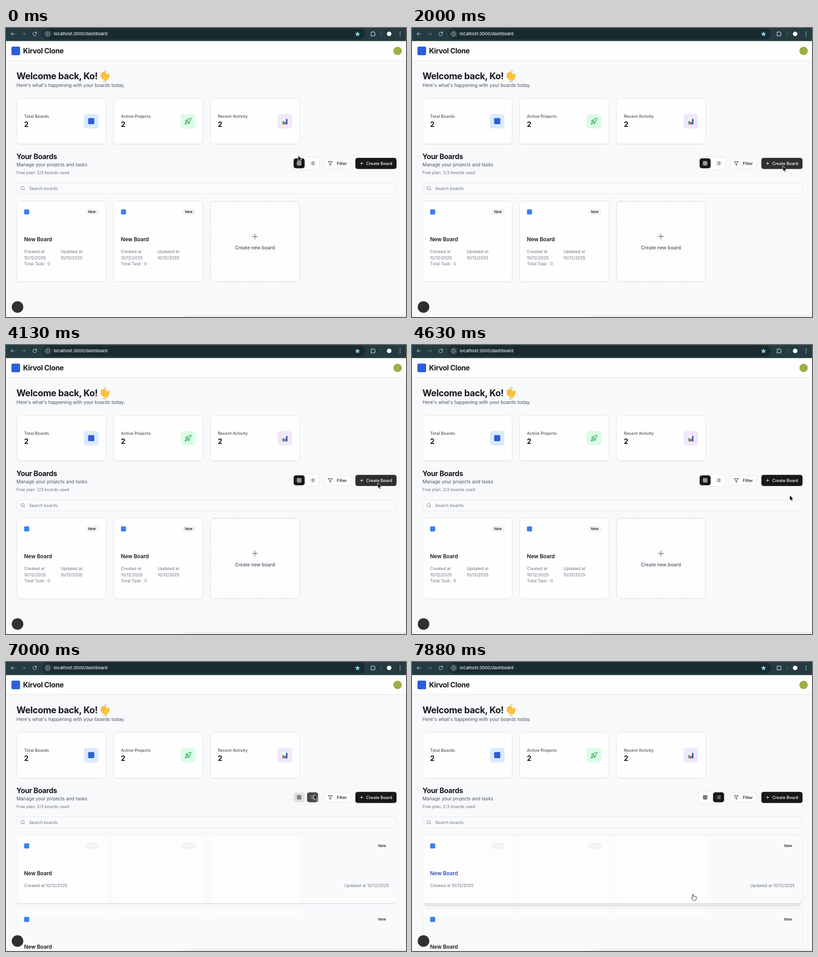
An HTML page that plays this animation: 879x637 px, repeating every 8 s.

```html
<!DOCTYPE html>
<html lang="en">
<head>
<meta charset="utf-8">
<title>Dashboard</title>
<style>
  html, body { margin: 0; width: 100%; height: 100%; overflow: hidden; background: #f8f9fb; }
  svg { display: block; }
  text { font-family: Inter, "Open Sans", sans-serif; font-optical-sizing: none; white-space: pre; }
  .icon { fill: none; stroke: currentColor; stroke-linecap: round; stroke-linejoin: round; }
  .heading { font-weight: 700; letter-spacing: -.02em; fill: #16181d; }
</style>
</head>
<body>
<svg id="stage" width="879" height="637" viewBox="0 0 879 637"></svg>
<script>
const INK = '#18181b', MUTED = '#4b5563', SOFT = '#6b7280', LINE = '#e3e6ea', BLUE = '#3b7ff5';
const SMALL = 9.13, BODY = 10.3;

const text = (x, y, value, size = SMALL, fill = MUTED, weight = 400, extra = '') =>
  `<text x="${x}" y="${y}" font-size="${size}" fill="${fill}" font-weight="${weight}" ${extra}>${value}</text>`;
const heading = (x, y, value, size = 15.6) =>
  `<text class="heading" x="${x}" y="${y}" font-size="${size}">${value}</text>`;
const box = (x, y, w, h, r, fill, stroke = 'none', extra = '') =>
  `<rect x="${x}" y="${y}" width="${w}" height="${h}" rx="${r}" fill="${fill}" stroke="${stroke}" ${extra}/>`;
const icon = (x, y, size, d, color, width = 2, extra = '') =>
  `<g transform="translate(${x} ${y}) scale(${size / 24})" color="${color}" ${extra}>
     <path class="icon" stroke-width="${width}" d="${d}"/></g>`;

const ICONS = {
  back: 'M20 12H4m7-7-7 7 7 7',
  forward: 'M4 12h16m-7-7 7 7-7 7',
  reload: 'M20 12a8 8 0 1 1-2.4-5.7L20 8.5M20 3v5.5h-5.5',
  info: 'M12 2a10 10 0 1 0 0 20a10 10 0 1 0 0-20M12 11v6M12 7v.2',
  puzzle: 'M4 6h5a2.5 2.5 0 1 1 5 0h5v5a2.5 2.5 0 1 1 0 5v5H4v-5a2.5 2.5 0 1 0 0-5z',
  rocket: 'M4.5 16.5c-1.5 1.3-2 5-2 5s3.7-.5 5-2c.7-.8.7-2.1-.1-2.9a2.2 2.2 0 0 0-2.9-.1z' +
    'M12 15l-3-3a22 22 0 0 1 2-4A13 13 0 0 1 22 2c0 2.7-.8 7.5-6 11a22 22 0 0 1-4 2z' +
    'M9 12H4s.6-3 2-4c1.6-1.1 5 0 5 0M12 15v5s3-.6 4-2c1.1-1.6 0-5 0-5',
  grid: 'M5 3h14a2 2 0 0 1 2 2v14a2 2 0 0 1-2 2H5a2 2 0 0 1-2-2V5a2 2 0 0 1 2-2zM3 9h18M3 15h18M9 3v18M15 3v18',
  list: 'M8 6h13M8 12h13M8 18h13M3 6h.1M3 12h.1M3 18h.1',
  filter: 'M22 3H2l8 9.5V19l4 2v-8.5z',
  plus: 'M5 12h14M12 5v14',
  search: 'M11 3a8 8 0 1 0 0 16a8 8 0 1 0 0-16M21 21l-4.3-4.3'
};

const browserBar = () => {
  const pale = '#d5dfe1';
  return box(0, 0, 879, 28.8, 0, '#243b41') + box(80, 1, 709, 24, 12, '#1a2b2f') +
    icon(9, 7, 12, ICONS.back, pale) + icon(33, 7, 12, ICONS.forward, '#73858a') +
    icon(57, 7, 12, ICONS.reload, pale) +
    '<circle cx="91.5" cy="13" r="9" fill="#2c4147"/>' + icon(86.5, 8, 10, ICONS.info, pale) +
    text(105, 16.4, 'localhost:3000/dashboard', 9.3, '#e6edee', 500) +
    '<path d="M772.5 7.5l1.6 3.700 4 .4-3 2.700.9 4-3.5-2.100-3.5 2.100.9-4-3-2.700 4-.4z" fill="#7fd3ee"/>' +
    icon(800, 6, 13, ICONS.puzzle, pale) +
    '<path d="M824.5 8v10" stroke="#50666b"/><circle cx="842" cy="13" r="5" fill="#fff"/>' +
    [9, 13, 17].map(y => `<circle cx="866" cy="${y}" r="1.1" fill="${pale}"/>`).join('');
};

const wavingHand = () => {
  const fingers = 'M-4.5 2.500L-5-4M-1.500 0L-1.700-7.500M1.700 0V-8M4.800 2L5-6';
  return `<g transform="translate(216.500 107) rotate(-38) scale(1.08)" stroke-linecap="round" fill="none">
    <path d="${fingers}" stroke="#e5a02c" stroke-width="3.700"/>
    <path d="${fingers}" stroke="#fbc540" stroke-width="2.800"/>
    <path d="M-6 0h12.600v4a6.300 5.600 0 0 1-12.600 0z" fill="#fbc540"/>
    <path d="M5.500 6l4-4.500" stroke="#f5b933" stroke-width="3.200"/>
    <path d="M-8 6q1.200 3.500 4.500 4.500M6.500-9.500q2.500 1 3.500 4" stroke="#9aa7ad" stroke-width="1"/>
  </g>`;
};

const shell = () => box(0, 28, 879, 43, 0, '#fefefe') + box(0, 71, 879, 1, 0, LINE) + browserBar() +
  box(12, 41, 19, 19, 3, '#2b5fd9') + heading(37.5, 56.2, 'Kirvol Clone') +
  '<circle cx="860.500" cy="50.500" r="9.300" fill="#9caf45"/>' +
  heading(23, 113, 'Welcome back, Ko!', 19.75) + wavingHand() +
  text(23, 129.7, "Here's what's happening with your boards today.", BODY);

const stats = () => ['Total Boards', 'Active Projects', 'Recent Activity'].map((label, i) => {
  const x = 23.5 + i * 212.8;
  return box(x, 155.5, 196.500, 100, 8, '#fefefe', LINE, 'filter="url(#small)"') +
    text(x + 16.3, 198.2, label, SMALL, MUTED, 500) + heading(x + 16.3, 218, '2') +
    box(x + 147.7, 189.500, 32, 32, 6, ['#dbeafe', '#dcfce7', '#f1e7fd'][i]);
}).join('') +
  box(180.5, 198.5, 13.500, 13.500, 2, '#2b5fd9') +
  icon(392, 197.500, 16, ICONS.rocket, '#2da650') +
  box(606.500, 199.500, 13, 13, 1, '#f5f4f8') +
  box(607.5, 205, 3.2, 7.5, 0, '#2d9a4c') + box(611.4, 207, 3.2, 5.5, 0, '#d3363e') +
  box(615.2, 200.500, 3.2, 12, 0, '#2451ae');

const toolbar = () => heading(23, 288.6, 'Your Boards') +
  text(23, 305.1, 'Manage your projects and tasks', BODY) +
  text(23, 322, 'Free plan: 2/3 boards used', SMALL, SOFT) +
  box(629.5, 284.5, 59.500, 27.500, 4, '#fefefe', LINE) +
  box(632, 287.3, 24.3, 22, 5, INK, 'none', 'id="gridButton"') +
  box(661.5, 287.3, 24.3, 22, 5, '#fff', 'none', 'id="listButton"') +
  icon(638.700, 292.800, 11, ICONS.grid, '#fff', 2, 'id="gridIcon"') +
  icon(668.200, 292.800, 11, ICONS.list, INK, 2, 'id="listIcon"') +
  box(700, 288, 57.500, 21, 4.5, '#fefefe', LINE) +
  icon(707, 293, 11, ICONS.filter, INK) + text(727, 301.7, 'Filter', SMALL, INK, 500) +
  box(767.7, 286.2, 90.5, 24.5, 5, INK, 'none', 'id="createButton"') +
  icon(776, 293, 11, ICONS.plus, '#fff') + text(791.5, 301.7, 'Create Board', SMALL, '#fafafa', 500) +
  box(23.5, 341.5, 834.500, 24, 4.5, '#f9fafb', LINE) +
  icon(31.500, 348, 11, ICONS.search, SOFT) + text(50.700, 357.2, 'Search boards', SMALL, SOFT);

const badge = (x, fill = '#f4f4f5', ink = INK) =>
  box(x, 398, 30, 14.500, 7.2, fill) + text(x + 14.5, 408.1, 'New', 7.8, ink, 500, 'text-anchor="middle"');
const swatch = (x, y) => box(x, y, 11.2, 11.2, 2.2, BLUE);

const gridView = () => [23.5, 236.3].map(x =>
  box(x, 381.5, 196.500, 177.500, 8, '#fefefe', LINE, 'filter="url(#small)"') +
  swatch(x + 16.3, 399.800) + badge(x + 150.8) +
  text(x + 16.3, 470.2, 'New Board', 11.6, INK, 600) +
  text(x + 16.3, 496.4, 'Created at', SMALL, SOFT) + text(x + 96.8, 496.4, 'Updated at', SMALL, SOFT) +
  text(x + 16.3, 509.8, '10/12/2025', SMALL, SOFT) + text(x + 96.8, 509.8, '10/12/2025', SMALL, SOFT) +
  text(x + 16.3, 523.2, 'Total Task : 0', SMALL, SOFT)).join('') +
  box(449.5, 382, 195.500, 177, 8, '#fdfdfe', '#d0d4da', 'stroke-width="1.300" stroke-dasharray="4 2.500"') +
  icon(537, 449.500, 20, ICONS.plus, SOFT, 1.6) +
  text(547, 487.5, 'Create new board', BODY, MUTED, 500, 'text-anchor="middle"');

const listCard = (y, titleId) =>
  swatch(39.8, y + 18.3) + text(826.5, y + 26.600, 'New', 7.8, INK, 500, 'text-anchor="middle"') +
  text(39.8, y + 88.7, 'New Board', 11.6, INK, 600, `id="${titleId}"`) +
  text(39.8, y + 114.9, 'Created at 10/12/2025', SMALL, SOFT) +
  text(841.3, y + 114.9, 'Updated at 10/12/2025', SMALL, SOFT, 400, 'text-anchor="end"');

const listView = () =>
  box(26, 525, 829, 14.500, 7, '#e6e8ea', 'none', 'id="lift"') +
  box(23.5, 381.5, 834, 151, 8, '#f9fafb', LINE, 'id="firstCard"') +
  box(23.5, 543.5, 834, 151.500, 8, '#f9fafb', LINE, 'id="secondCard"') +
  // faint lighter panels behind the rows
  [24, 236, 448.5].map(x => box(x, 382, 197, 150.500, 7, '#fdfdfe') + box(x, 544, 197, 16, 4, '#fcfcfd')).join('') +
  [174.3, 387].map(x => badge(x, '#f3f3f4', '#fcfcfc')).join('') +
  '<path d="M25 529q2 3.500 6 3.500H850q4 0 6-3.500" fill="none" stroke="#cdd0d4"/>' +
  listCard(381.5, 'firstTitle') + listCard(543.5, 'secondTitle');

const overlay = () =>
  '<path d="M385 637q8-4 24-4.500H879V637z" fill="#eceef0"/>' +
  '<circle cx="25.300" cy="615" r="12.700" fill="#303033"/>' +
  `<path id="arrow" d="M0 0v11.800l2.700-2.500 1.900 4.200 2-.9-1.800-4.100h3.700z" fill="#000" stroke="#fff" stroke-width=".9"/>
   <path id="hand" d="M0 1.300a1.200 1.200 0 0 1 2.400 0V5q1.200-.8 2 .3 1.200-.7 2 .3 1.800-.6 2.100 1V9q0 3-1.800 5H1.500
     Q-.5 11.500-3 8.800q.5-1.700 3 0z" fill="#fff" stroke="#222" stroke-width="1" stroke-linejoin="round"/>`;

const stage = document.getElementById('stage');
stage.innerHTML = `<defs><filter id="small" x="-5%" y="-10%" width="110%" height="125%">
    <feDropShadow dx="0" dy=".8" stdDeviation=".7" flood-opacity=".09"/></filter></defs>
  ${box(0, 0, 879, 637, 0, '#f8f9fb')}${shell()}${stats()}${toolbar()}
  <g id="gridView">${gridView()}</g><g id="listView">${listView()}</g>${overlay()}`;

const part = id => document.getElementById(id);
const paint = (id, name, value) => part(id).setAttribute(name, value);
const show = (id, visible) => paint(id, 'display', visible ? 'inline' : 'none');
const clamp = v => Math.max(0, Math.min(1, v));
const gray = (from, to, p) => {
  const v = Math.round(from + (to - from) * p);
  return `rgb(${v},${v},${v})`;
};

// pointer path: time, x, y
const PATH = [
  [0, 642, 281], [250, 281, 372], [500, 600, 481], [625, 690, 450], [875, 743, 386],
  [1500, 743, 386], [1750, 772, 352], [2000, 815, 304], [2125, 817, 304],
  [4125, 817, 304], [4250, 819, 309], [4625, 830, 331],
  [5000, 830, 331], [5125, 815, 326], [5375, 690, 288], [5500, 652, 283], [5625, 677, 292],
  [7375, 677, 292], [7500, 675, 308], [7750, 628, 480], [7875, 616.5, 511.5]
];

function pointerAt(t) {
  const next = PATH.findIndex(point => point[0] > t);
  if (next < 0) return PATH[PATH.length - 1].slice(1);
  const [t0, x0, y0] = PATH[next - 1], [t1, x1, y1] = PATH[next];
  const p = (t - t0) / (t1 - t0);
  return [x0 + (x1 - x0) * p, y0 + (y1 - y0) * p];
}

const LOOP = 8000, STEP = 125;

function render(now) {
  const t = Math.floor(((now % LOOP) + 1) / STEP) * STEP % LOOP;
  const [x, y] = pointerAt(t);
  const isList = t >= 7000;
  const overCreate = x > 768 && x < 858 && y > 286 && y < 310;
  const overCard = isList && y > 381 && y < 533;
  const overToggle = y > 287 && y < 309;

  show('gridView', !isList);
  show('listView', isList);
  const fade = 1 - (1 - clamp((t - 6875) / 375)) ** 5;
  paint('gridButton', 'fill', gray(25, 254, fade));
  paint('listButton', 'fill', gray(254, overToggle ? 47 : 25, fade));
  paint('gridIcon', 'color', gray(255, 25, fade));
  paint('listIcon', 'color', gray(25, 250, fade));
  paint('createButton', 'fill', overCreate ? '#2f2f32' : INK);

  const borderOpacity = t < 7125 ? .35 : 1;
  paint('firstCard', 'stroke-opacity', borderOpacity);
  paint('secondCard', 'stroke-opacity', borderOpacity);
  paint('firstTitle', 'fill', overCard ? '#2f4fbd' : INK);
  show('lift', overCard);

  show('arrow', !overCard);
  show('hand', overCard);
  paint(overCard ? 'hand' : 'arrow', 'transform', `translate(${x.toFixed(1)} ${y.toFixed(1)})`);
}

let start;
function tick(now) {
  start ??= now;
  render(now - start);
  requestAnimationFrame(tick);
}
render(0);
requestAnimationFrame(tick);
</script>
</body>
</html>
```
